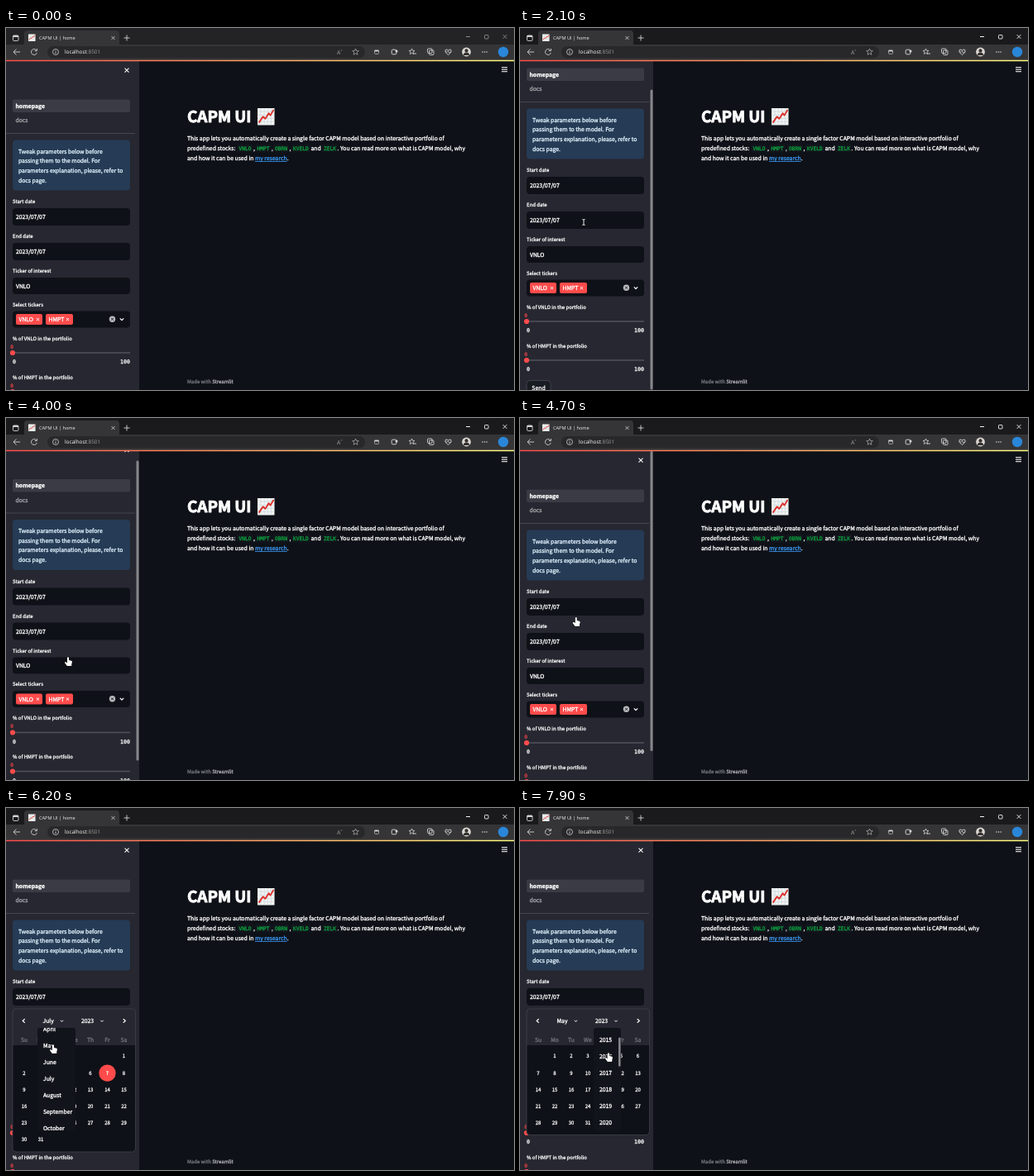
Animation of 614 by 438 pixels, one loop 8000 ms. Source, as an HTML page with a canvas:

```html
<!DOCTYPE html>
<html lang="en">
<head>
<meta charset="utf-8">
<title>CAPM UI</title>
<style>
html, body { margin: 0; width: 614px; height: 438px; overflow: hidden; background: #0e1117; }
canvas { display: block; }
</style>
</head>
<body>
<canvas id="stage" width="614" height="438"></canvas>
<script>
const ctx = document.getElementById('stage').getContext('2d');
const LOOP = 8000, STEP = 100;
const SANS = '"Noto Sans CJK JP", "Noto Sans CJK SC", "Noto Sans CJK", "Open Sans", sans-serif';
const CHROME = '"Open Sans", "Noto Sans", sans-serif';
const MONO = '"DejaVu Sans Mono", "Liberation Mono", monospace';
const PAGE = '#0e1117', SIDE = '#262730', RED = '#ff4b4b', INK = '#fff';
const BODY = 7.63, SMALL = 6.67;
const STOCKS = ['VNLO', 'HMPT', 'OBRN', 'KVELD', 'ZELK'];
const MONTHS = ['January', 'February', 'March', 'April', 'May', 'June', 'July',
  'August', 'September', 'October', 'November', 'December'];
const COLS = [22, 42, 62, 82, 102, 122.5, 142.5];

const clamp = v => Math.max(0, Math.min(1, v));
const ease = v => v * v * (3 - 2 * v);

// Eased value along [time, a, b, ...] keys
function track(keys, t) {
  let i = 0;
  while (i < keys.length - 1 && keys[i + 1][0] <= t) i++;
  const a = keys[i], b = keys[i + 1] || a;
  const k = a === b ? 0 : ease(clamp((t - a[0]) / (b[0] - a[0])));
  return a.slice(1).map((v, j) => v + (b[j + 1] - v) * k);
}

// Text placed by the middle of its capitals; a hairline stroke makes it a little heavier
function text(str, x, cy, size = BODY, color = INK, { weight = 400, align = 'left', font = SANS } = {}) {
  const px = font === SANS ? size / 1.117 : size;
  const y = cy + (font === SANS ? 0.33 : 0.36) * size;
  ctx.font = `${weight} ${px}px ${font}`;
  ctx.textAlign = align;
  ctx.fillStyle = ctx.strokeStyle = color;
  ctx.fillText(str, x, y);
  if (font !== CHROME) {
    ctx.lineWidth = size * .042;
    ctx.strokeText(str, x, y);
  }
  return ctx.measureText(str).width;
}

function rect(x, y, w, h, color, r = 0) {
  ctx.fillStyle = color;
  ctx.beginPath();
  ctx.roundRect(x, y, w, h, r);
  ctx.fill();
}

function frame(x, y, w, h, color, r = 0, lw = 1) {
  ctx.strokeStyle = color;
  ctx.lineWidth = lw;
  ctx.beginPath();
  ctx.roundRect(x, y, w, h, r);
  ctx.stroke();
}

function dot(x, y, r, color) {
  ctx.fillStyle = color;
  ctx.beginPath();
  ctx.arc(x, y, r, 0, 7);
  ctx.fill();
}

function ring(x, y, r, color, lw = 1, from = 0, to = 6.3) {
  ctx.strokeStyle = color;
  ctx.lineWidth = lw;
  ctx.beginPath();
  ctx.arc(x, y, r, from, to);
  ctx.stroke();
}

// Points as x, y pairs relative to an anchor
function line(x, y, pts, color, lw = 1, close = false) {
  ctx.strokeStyle = color;
  ctx.lineWidth = lw;
  ctx.beginPath();
  for (let i = 0; i < pts.length; i += 2) ctx.lineTo(x + pts[i], y + pts[i + 1]);
  if (close) ctx.closePath();
  ctx.stroke();
}

function cross(x, y, r, color, lw = 1) {
  line(x, y, [-r, -r, r, r], color, lw);
  line(x, y, [-r, r, r, -r], color, lw);
}

const down = (x, y, r = 2, lw = 1) => line(x, y, [-r, -r / 2, 0, r / 2, r, -r / 2], INK, lw);

function clip(x, y, w, h, draw) {
  ctx.save();
  ctx.beginPath();
  ctx.rect(x, y, w, h);
  ctx.clip();
  draw();
  ctx.restore();
}

function chartIcon(x, y, s) {
  rect(x, y, s, s, '#f3f4f2');
  for (let i = 1; i < 5; i++) {
    line(x, y, [s * i / 5, 0, s * i / 5, s], '#c4d3da', s / 32);
    line(x, y, [0, s * i / 5, s, s * i / 5], '#c4d3da', s / 32);
  }
  line(x, y, [.08, .86, .32, .5, .46, .62, .66, .3, .76, .42, .95, .1].map(v => v * s), '#dc2f2a', s / 11);
}

function star(x, y, r, color) {
  const pts = [];
  for (let i = 0; i < 10; i++) {
    const a = -Math.PI / 2 + i * Math.PI / 5, d = i % 2 ? r * .45 : r;
    pts.push(Math.cos(a) * d, Math.sin(a) * d);
  }
  line(x, y, pts, color, .8, true);
}

function browser(focused) {
  const ctl = focused ? '#f2f2f2' : '#8b8b8b', icon = '#d4d4d4';
  rect(0, 0, 614, 21, focused ? '#1a1a1c' : '#232325');
  rect(22, 3, 115, 20, '#353537', 4);
  rect(0, 20, 614, 19, '#353537');

  frame(8.5, 9, 6.5, 6.5, icon, 1.2, .9);
  rect(8.5, 9, 6.5, 2, icon);
  chartIcon(27, 7.5, 8.5);
  text('CAPM UI | home', 40, 12, 5.6, '#ededed', { font: CHROME });
  cross(129.5, 12, 2, icon, .8);
  line(146, 12, [-3.5, 0, 3.5, 0], icon, .9);
  line(146, 12, [0, -3.5, 0, 3.5], icon, .9);
  line(558.5, 10.5, [-2.5, 0, 2.5, 0], ctl);
  frame(578.5, 8.5, 4.5, 4.5, ctl, .8, .9);
  cross(603, 10.5, 2.4, ctl, .9);

  line(13, 29, [4, 0, -4, 0], icon, .9);
  line(13, 29, [-.5, -3.5, -4, 0, -.5, 3.5], icon, .9);
  ring(34, 29, 3.4, icon, .9, .3, 5.6);
  line(34, 29, [3.4, -4, 3.4, -1.4, .8, -1.4], icon, .9);
  rect(50, 22, 384, 14.5, '#28282a', 7);
  ring(60, 29, 3.5, icon, .8);
  line(60, 29, [0, -.4, 0, 2], icon, .9);
  line(60, 29, [0, -2, 0, -1.2], icon, .9);
  const w = text('localhost', 71, 29, 6.4, '#fff', { font: CHROME });
  text(':8501', 71 + w, 29, 6.4, '#9c9c9c', { font: CHROME });

  text('A', 400, 29.5, 6.8, '#a5a5a5', { font: CHROME });
  text('»', 404.5, 27, 4, '#a5a5a5', { font: CHROME });
  star(422.5, 29, 4, '#a5a5a5');
  frame(445.5, 27, 5, 4.4, '#a5a5a5', 1, .9);
  rect(445.5, 26.8, 5, 1.6, icon);
  frame(466.2, 26.2, 5.6, 5.6, icon, 1.2, 1);
  dot(472, 28, 1.5, icon);
  star(490.5, 28.6, 3.6, icon);
  line(494, 31, [-2, 0, 2, 0], icon, .9);
  frame(509.5, 25, 5.5, 5.5, icon, 1, .9);
  frame(511.5, 27, 5.5, 5.5, icon, 1, .9);
  line(534.5, 29, [0, 3.6, -3.6, 0, -3.3, -2.6, -1.2, -3, 0, -1.6, 1.2, -3, 3.3, -2.6, 3.6, 0], icon, .9, true);
  line(534.5, 29, [-3.4, 0, -1, 0, 0, -1.3, 1, 1, 3.4, 0], icon, .7);
  dot(556.5, 29, 5.4, '#dcd9d4');
  dot(556.5, 27.4, 2.1, '#34302e');
  ctx.beginPath();
  ctx.arc(556.5, 33, 3.6, Math.PI, 0);
  ctx.fill();
  for (const dx of [-2.6, 0, 2.6]) dot(578.5 + dx, 29, .8, icon);
  dot(601, 29, 6.2, '#2a86d8');
}

function mainPage() {
  text('CAPM UI', 219, 106.9, 21, INK, { weight: 700 });
  chartIcon(304, 97, 20.5);
  text('This app lets you automatically create a single factor CAPM model based on interactive portfolio of', 219, 133);
  text('predefined stocks:', 219, 145.5);
  [281.5, 303.5, 325, 347, 384].forEach((x, i) => {
    rect(x - 2.5, 140.5, STOCKS[i].length * 3.73 + 5, 10, '#12161d', 2);
    text(STOCKS[i], x, 145.8, 6.2, '#0cab40', { font: MONO });
    if (i < 3) text(',', x + 17.5, 145.5);
  });
  text('and', 368.5, 145.5);
  text('. You can read more on what is CAPM model, why', 400.5, 145.5);
  const x = 219 + text('and how it can be used in ', 219, 157.8);
  const w = text('my research', x, 157.8, BODY, '#3b99f5');
  line(x, 161.5, [0, 0, w, 0], '#3b99f5', .8);
  text('.', x + w, 157.8);
  const f = text('Made with ', 219, 428, SMALL, '#777a80');
  text('Streamlit', 219 + f, 428, SMALL, '#b4b6ba', { weight: 500 });
  for (const y of [47.7, 50.2, 52.7]) line(599, y, [0, 0, 7, 0], '#f0f0f0', 1.1);
}

function field(label, value, y, h = 21, focus = false) {
  text(label, 8, y - 8, SMALL);
  rect(8, y, 142, h, PAGE, 4);
  if (focus) frame(8.5, y + .5, 141, h - 1, '#b83c43', 3.5, .8);
  if (value) text(value, 12, y + h / 2);
}

function slider(name, y) {
  text(`% of ${name} in the portfolio`, 8, y - 17.5, SMALL);
  text('0', 7, y - 7.5, 6.2, '#e04347', { font: MONO, align: 'center' });
  line(8, y, [0, 0, 142, 0], '#50525c', 1.6);
  dot(8, y, 3.1, RED);
  text('0', 8, y + 11, 6.6, INK, { font: MONO });
  text('100', 150, y + 11, 6.6, INK, { font: MONO, align: 'right' });
}

function sidebar(scroll, focus) {
  rect(0, 39, 161, 399, SIDE);
  ctx.save();
  ctx.translate(0, -scroll);
  cross(146, 51.2, 2.5, INK, 1.1);
  rect(8, 86.5, 142, 15.5, '#3a3b44', 2);
  text('homepage', 11.5, 94.3, BODY, INK, { weight: 700 });
  text('docs', 11.5, 111.6, BODY, '#a5a6ab');
  line(0, 127.5, [0, 0, 156, 0], '#454650');
  rect(8, 135.5, 142, 61, '#263b55', 4);
  ['Tweak parameters below before', 'passing them to the model. For',
    'parameters explanation, please, refer to', 'docs page.'].forEach((s, i) =>
    text(s, 15, 149.2 + i * 11.6, BODY, '#e0f3fd'));
  field('Start date', '2023/07/07', 218, 21, focus);
  field('End date', '2023/07/07', 260);
  field('Ticker of interest', STOCKS[0], 302, 20);
  field('Select tickers', '', 342.5, 20);
  [12, 48].forEach((x, i) => {
    rect(x, 346, 32 + i, 13, RED, 2);
    text(STOCKS[i], x + 3.5, 352.5);
    cross(x + 26.5, 352.6, 1.6, INK);
  });
  dot(128.5, 352.3, 3.7, '#b9babd');
  cross(128.5, 352.3, 1.4, PAGE, .9);
  down(140, 352.5, 2.2, 1.3);
  slider(STOCKS[0], 393);
  slider(STOCKS[1], 440);
  rect(8, 464.5, 29, 18, '#191b22', 4);
  frame(8, 464.5, 29, 18, '#4a4c55', 4, .8);
  text('Send', 22.5, 473, BODY, INK, { align: 'center' });
  ctx.restore();
}

function calendar(may) {
  const first = may ? 1 : 6;
  const h = may ? 152.5 : 173;
  rect(8, 243, 148.5, h, PAGE, 4);
  rect(8, 243, 148.5, 44, SIDE, [4, 4, 0, 0]);
  frame(8, 243, 148.5, h, '#464750', 4, .7);
  line(21.5, 257.5, [1.3, -2.4, -1.3, 0, 1.3, 2.4], INK, 1.2);
  line(143, 257.5, [-1.3, -2.4, 1.3, 0, -1.3, 2.4], INK, 1.2);
  text(may ? 'May' : 'July', 44.5, 257.3, BODY, INK, { weight: 500 });
  text('2023', 91, 257.3, BODY, INK, { weight: 500 });
  down(67.5, 257.7, 1.7);
  down(116, 257.7, 1.7);
  ['Su', 'Mo', 'Tu', 'We', 'Th', 'Fr', 'Sa'].forEach((d, i) =>
    text(d, COLS[i], 280, BODY, '#6f7179', { align: 'center' }));
  for (let d = 1; d <= 31; d++) {
    const n = d + first - 1, x = COLS[n % 7], y = 300.2 + Math.floor(n / 7) * 20.2;
    const picked = !may && d === 7;
    if (picked) dot(x, y + .4, 10.2, RED);
    text(String(d), x, y, SMALL, INK, { weight: 500, align: 'center' });
  }
}

function menu(items, x, w, top, alpha, bar) {
  ctx.save();
  ctx.globalAlpha = alpha;
  rect(x, 266, w, 124, '#12141b', 3);
  clip(x, 266, w, 124, () => items.forEach((s, i) => {
    const y = top + i * 20;
    if (y > 255 && y < 400) text(s, x + 7, y, BODY, INK, { weight: 500 });
  }));
  if (bar) rect(x + w - 3, 267 + (277 - top) * .29, 2.6, 35, '#85868b', 1);
  ctx.restore();
}

function pointer(kind, x, y) {
  ctx.save();
  ctx.translate(x, y);
  ctx.lineJoin = 'round';
  if (kind === 'beam') {
    line(0, 0, [-1.6, -3.5, 0, -3, 1.6, -3.5], '#fff', .9);
    line(0, 0, [0, -3, 0, 3], '#fff', .9);
    line(0, 0, [-1.6, 3.5, 0, 3, 1.6, 3.5], '#fff', .9);
  } else {
    const shape = kind === 'arrow'
      ? 'M0 0V8.4L2 6.6L3.4 9.6L4.8 9L3.5 6.1H6.1Z'
      : 'M-1 1Q0 -.6 1 1V4L4 4.8Q5 5.2 4.9 6.3L4.2 9.2V11H-1.2L-4 7.3Q-4.2 6 -2.8 6.2L-1 7.2Z';
    const p = new Path2D(shape);
    ctx.strokeStyle = '#111';
    ctx.lineWidth = 1;
    ctx.stroke(p);
    ctx.fillStyle = '#fff';
    ctx.fill(p);
  }
  ctx.restore();
}

const PATH = [[200, 470, 30], [700, 340, 93], [1000, 340, 93], [1800, 88, 222], [2100, 77, 235],
  [2700, 77, 235], [3500, 75, 289], [4200, 75, 289], [4900, 66, 229], [5100, 66, 229],
  [5500, 71, 261], [5700, 71, 261], [6200, 57, 286], [6400, 57, 286], [6800, 112, 255],
  [6900, 112, 255], [7200, 107, 296]];
const SCROLL = [[1800, 0], [2100, 38], [3700, 38], [4000, 12.5], [4200, 0]];
const YEARS = [[7200, 0], [7800, 113]];

function draw(t) {
  const open = t >= 5000, may = t >= 6400;
  const scroll = track(SCROLL, t)[0];
  rect(0, 0, 614, 438, PAGE);
  mainPage();
  clip(0, 39, 161, 399, () => {
    sidebar(scroll, open && t < 5700);
    if (t >= 1600 && !open) rect(157.5, 40 + scroll * .91, 3, 363, '#85868b', 1.5);
    if (open) calendar(may);
  });
  browser(t >= 400);
  const glow = ctx.createLinearGradient(0, 0, 614, 0);
  glow.addColorStop(0, RED);
  glow.addColorStop(1, '#fffd80');
  rect(0, 38.7, 614, 1.5, glow);

  if (t >= 5700 && !may) menu(MONTHS, 38, 46, 327 - 6 * 20, clamp((t - 5640) / 180), false);
  if (t >= 6800) {
    const years = Array.from({ length: 21 }, (_, i) => String(2013 + i));
    menu(years, 89, 33, 127 + track(YEARS, t)[0], clamp((t - 6745) / 180), t > 7200);
  }
  if (t >= 200) {
    const [x, y] = track(PATH, t);
    pointer(t < 1800 ? 'arrow' : t < 3400 ? 'beam' : 'hand', x, y);
  }
}

function tick() {
  ctx.textRendering = 'geometricPrecision';
  ctx.lineJoin = 'round';
  draw(Math.floor(performance.now() % LOOP / STEP) * STEP);
  requestAnimationFrame(tick);
}
tick();
</script>
</body>
</html>
```
